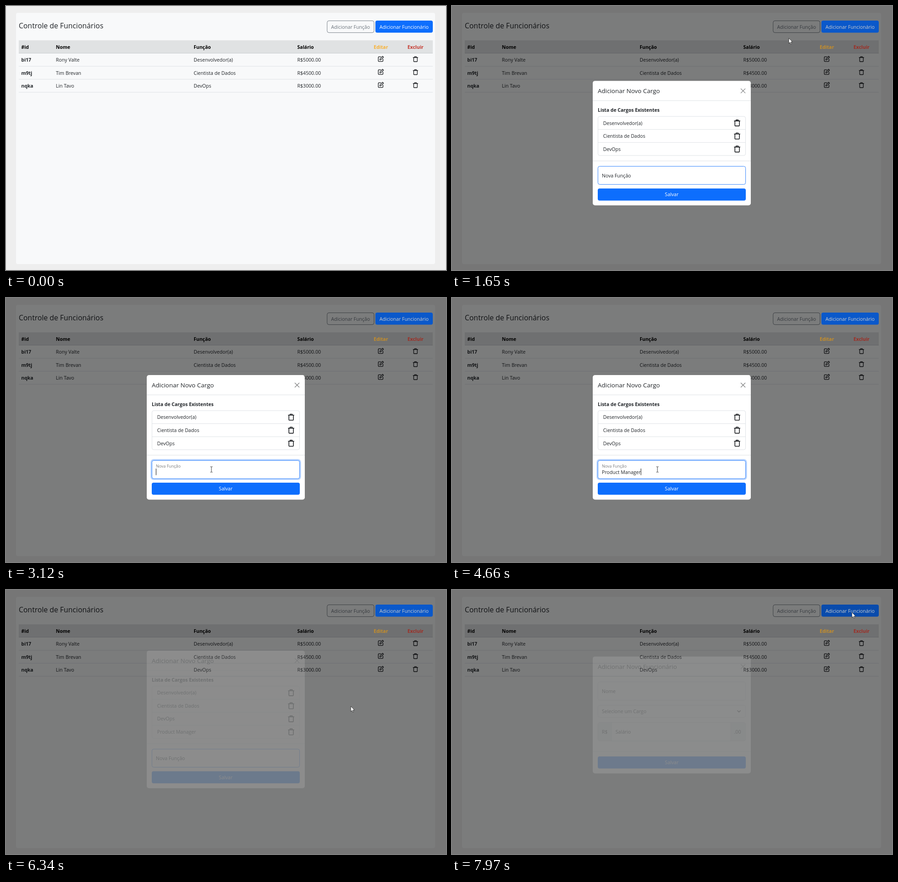
Write an HTML page that moves like this. It is 966 px wide and 579 px high and loops after 7.99 s.

```html
<!DOCTYPE html>
<html lang="pt-BR">
<head>
<meta charset="utf-8">
<title>Controle de Funcionários</title>
<style>
  html, body { margin: 0; width: 100%; height: 100%; overflow: hidden; background: #eee; }
  svg { display: block; }
  text { font: 10.6px "Open Sans", "Noto Sans", sans-serif; fill: #212529; white-space: pre; }
  .bold { font-weight: 700; font-size: 10.5px; }
  .dark { fill: #000; }
  .mid { text-anchor: middle; }
  .white { fill: #fff; }
  .title { font-weight: 500; font-size: 13.5px; }
  .heading { font-weight: 500; font-size: 15.9px; }
  .rule { stroke: #dee2e6; }
  .box { fill: #fff; stroke: #ced4da; stroke-width: .8; }
  .addon { fill: #e9ecef; stroke: #ced4da; stroke-width: .8; }
  .icon { fill: none; stroke: #16191c; stroke-width: 1.3; stroke-linejoin: round; }
</style>
</head>
<body>
<svg id="stage" width="966" height="579" viewBox="0 0 966 579"></svg>
<script>
const LOOP = 7990, ROW = 28.6, CENTER = 305.6;

const text = (x, y, s, cls = '', attrs = '') => `<text x="${x}" y="${y}" class="${cls}" ${attrs}>${s}</text>`;
const rect = (x, y, w, h, attrs = '') => `<rect x="${x}" y="${y}" width="${w}" height="${h}" ${attrs}/>`;
const rule = (x1, x2, y) => `<path class="rule" d="M${x1} ${y}H${x2}"/>`;
const icon = (x, y, d, scale = 1) => `<path class="icon" transform="translate(${x} ${y}) scale(${scale})" d="${d}"/>`;

const TRASH = 'M-5.5-3.5H5.5M-2-3.5V-5.4H2V-3.5M-4-3.5V4.6a.9.9 0 0 0 .9.9H3.1a.9.9 0 0 0 .9-.9V-3.5';
const EDIT = 'M.5-4.6H-4.6a1 1 0 0 0-1 1V4.6a1 1 0 0 0 1 1H3.6a1 1 0 0 0 1-1V0M-2.2 2.3l.4-2.4L3.8-5.7l2 2L.2 1.9Z';
const CLOSE = 'M-5-5L5 5M5-5L-5 5';

const people = [
  ['bi17', 'Rony Valte', 'Desenvolvedor(a)', 'R$5000.00'],
  ['m9tj', 'Tim Brevan', 'Cientista de Dados', 'R$4500.00'],
  ['nqka', 'Lin Tavo', 'DevOps', 'R$3000.00'],
];
const roles = [...people.map(p => p[2]), 'Product Manager'];
const columns = [33.5, 109.5, 412, 639.5];

const tableRow = (cells, i) => {
  const y = 118 + i * 28.5;
  return cells.map((s, c) => text(columns[c], y + 4, s, c ? '' : 'bold')).join('')
    + icon(823, y - 2, EDIT) + icon(899, y - 1.5, TRASH) + rule(28, 937, y + 14.2);
};

const page = rect(0, 0, 966, 579, 'fill="#eee"')
  + rect(22, 15, 920, 551, 'rx="4" fill="#f8f9fa"')
  + text(28, 48.7, 'Controle de Funcionários', 'heading')
  + rect(705, 32.4, 103, 26, 'id="roleButton" rx="4" stroke="#6c757d" stroke-width=".9"')
  + text(756.5, 49.5, 'Adicionar Função', 'mid', 'id="roleLabel"')
  + rect(28, 75.3, 909, 28, 'fill="#e0e2e3"')
  + '<path d="M28 103.5H937" stroke="#c9cccf"/>'
  + ['#id', 'Nome', 'Função', 'Salário'].map((s, c) => text(columns[c], 93.7, s, 'bold dark')).join('')
  + people.map(tableRow).join('');

const accents = rect(811, 32, 126, 26.6, 'id="staffButton" rx="4"')
  + text(874, 49.5, 'Adicionar Funcionário', 'mid white')
  + text(823, 93.7, 'Editar', 'bold mid', 'style="fill:#f8b133"')
  + text(899, 93.7, 'Excluir', 'bold mid', 'style="fill:#c5382d"');

// Dialog parts are placed relative to the top edge of the dialog.
const dialogHead = title => text(320, 27.3, title, 'title')
  + `<g opacity=".55">${icon(639, 22, CLOSE)}</g>` + rule(309, 656, 43.5);
const saveButton = (y, id) => rect(320, y, 325, 26.5, `id="${id}" rx="4" fill="#0d6efd"`)
  + text(482.3, y + 17.3, 'Salvar', 'mid white');

const roleItem = (name, i) => `<g id="item${i}">`
  + (i ? rule(320.5, 644.5, 78 + i * ROW) : '')
  + text(331.8, 96.4 + i * ROW, name) + icon(626, 92.3 + i * ROW, TRASH, 1.22) + '</g>';

const roleDialog = rect(309, 0, 347, 273.2, 'id="rolePanel" rx="5" fill="#fff"')
  + dialogHead('Adicionar Novo Cargo')
  + text(320, 68, 'Lista de Cargos Existentes', 'bold')
  + rect(320.5, 78, 324, 3 * ROW, 'id="list" rx="4" fill="none" stroke="#dee2e6"')
  + roles.map(roleItem).join('')
  + '<g id="roleForm">' + rule(309, 656, 175.7)
  + rect(319, 186, 327, 42.4, 'id="glow" rx="5" fill="none" stroke="#0d6efd" stroke-opacity=".28" stroke-width="3.4"')
  + rect(320.4, 187.4, 324.2, 39.8, 'rx="4" fill="#fff" stroke="#3485fd" stroke-width="1"')
  + text(0, 0, 'Nova Função', '', 'id="floatLabel"')
  + text(329, 217, '', '', 'id="typed"')
  + rect(0, 205, 1, 14.5, 'id="caret" fill="#111"')
  + saveButton(236, 'saveRole') + '</g>';

const staffDialog = rect(309, 0, 347, 256.4, 'rx="5" fill="#fff"')
  + dialogHead('Adicionar Novo Funcionário')
  + rect(320.4, 55.5, 324.2, 40.5, 'class="box" rx="4"') + text(329, 79.7, 'Nome')
  + rect(320.4, 107, 324.2, 26.4, 'class="box" rx="4"') + text(329, 124, 'Selecione um Cargo')
  + icon(630, 120, 'M-3.5-1.7L0 1.8L3.5-1.7')
  + rect(320.4, 144.6, 324.2, 40.5, 'class="addon" rx="4"')
  + rect(350, 144.6, 262, 40.5, 'class="box"')
  + text(329, 168.7, 'R$') + text(359, 168.7, 'Salário') + text(619.5, 168.7, '.00')
  + rule(309, 656, 208) + saveButton(219, 'saveStaff');

const stage = document.getElementById('stage');
stage.innerHTML = page
  + rect(0, 0, 966, 579, 'id="backdrop"')
  + `<g id="accents">${accents}</g><g id="roleDialog">${roleDialog}</g><g id="staffDialog">${staffDialog}</g>`
  + `<path id="arrow" d="M0 0V11.6L2.7 9.1L4.4 13L6.2 12.2L4.5 8.4H8.1Z" fill="#fff" stroke="#222" stroke-width=".8"/>`
  + `<path id="beam" d="M-2.5-6H-.5L0-5.5L.5-6H2.5M0-5.5V5.5M-2.5 6H-.5L0 5.5L.5 6H2.5" fill="none" stroke="#222" stroke-width=".9"/>`;
const el = {};
stage.querySelectorAll('[id]').forEach(node => el[node.id] = node);

const ramp = (t, start, length) => Math.min(1, Math.max(0, (t - start) / length));
const pulse = (t, on, off, length = 150) => ramp(t, on, length) - ramp(t, off, length);
const easeOut = p => 1 - (1 - p) ** 1.7;
const mix = (a, b, p) => `color-mix(in srgb, ${b} ${p * 100}%, ${a})`;
const show = (node, visible) => node.style.display = visible ? '' : 'none';
const set = (node, attrs) => { for (const k in attrs) node.setAttribute(k, attrs[k]); };

// Pointer stops: time, x, y
const path = [
  [0, 916, 600], [235, 916, 600], [255, 914, 571], [600, 850, 330], [900, 776, 115], [1030, 768, 60],
  [1160, 767, 45], [1500, 767, 45], [1790, 714, 94], [1890, 714, 94], [2250, 509, 240],
  [2570, 451, 376], [4670, 451, 376], [4900, 483, 424], [5660, 483, 424],
  [5960, 744, 288], [6180, 757, 255], [6480, 757, 255], [6930, 873, 66],
  [7110, 873, 66], [7400, 878, 49], [LOOP, 878, 49],
];
const pointerAt = t => {
  const i = path.findIndex(k => k[0] > t), [a, b] = [path[i - 1], path[i]];
  const p = (t - a[0]) / (b[0] - a[0]);
  return [a[1] + (b[1] - a[1]) * p, a[2] + (b[2] - a[2]) * p];
};

function placeDialog(node, height, opacity, lift) {
  show(node, opacity > 0);
  node.style.opacity = opacity;
  set(node, { transform: `translate(0 ${CENTER - height / 2 - 35 * lift})` });
}

function drawRoleForm(t) {
  const saved = t >= 5040, extra = saved ? ROW : 0;
  placeDialog(el.roleDialog, 273.2 + extra, pulse(t, 1445, 6210),
    1 - easeOut(ramp(t, 1445, 300)) + easeOut(ramp(t, 6210, 300)));
  set(el.rolePanel, { height: 273.2 + extra });
  set(el.list, { height: 3 * ROW + extra });
  set(el.roleForm, { transform: `translate(0 ${extra})` });
  show(el.item3, saved);

  const float = pulse(t, 2820, 5040, 100);
  set(el.floatLabel, { transform: `translate(329 ${211.5 - 8.7 * float}) scale(${1 - .15 * float})`, opacity: 1 - .4 * float });
  el.glow.style.opacity = pulse(t, 2820, 5000);
  const typed = saved ? '' : roles[3].slice(0, Math.ceil(15 * ramp(t, 4000, 215)));
  el.typed.textContent = typed;
  set(el.caret, { x: 329 + (typed ? el.typed.getComputedTextLength() : 0) });
  show(el.caret, t > 3010 && t < 3510 || t >= 4010 && t < 4720);
  el.saveRole.style.fill = mix('#0d6efd', '#0b5ed7', pulse(t, 4840, 5690));
}

function draw(t) {
  const dim = pulse(t, 1292, 6510) + ramp(t, 7800, 150);
  el.backdrop.style.opacity = dim / 2;
  el.accents.style.filter = `brightness(${1 - .2 * dim})`;

  const hover = pulse(t, 1040, 1295);
  el.roleButton.style.fill = `rgba(108,117,125,${hover})`;
  el.roleLabel.style.fill = mix('#6c757d', '#fff', hover);
  el.staffButton.style.fill = mix('#0d6efd', '#0b5ed7', ramp(t, 7180, 150));

  drawRoleForm(t);
  placeDialog(el.staffDialog, 256.4, ramp(t, 7953, 150), 1 - easeOut(ramp(t, 7953, 300)));

  const typing = t > 2525 && t < 4780;
  const transform = `translate(${pointerAt(t)})`;
  set(el.arrow, { transform });
  set(el.beam, { transform });
  show(el.arrow, !typing);
  show(el.beam, typing);
}

function tick() {
  draw(performance.now() % LOOP);
  requestAnimationFrame(tick);
}
tick();
</script>
</body>
</html>
```
